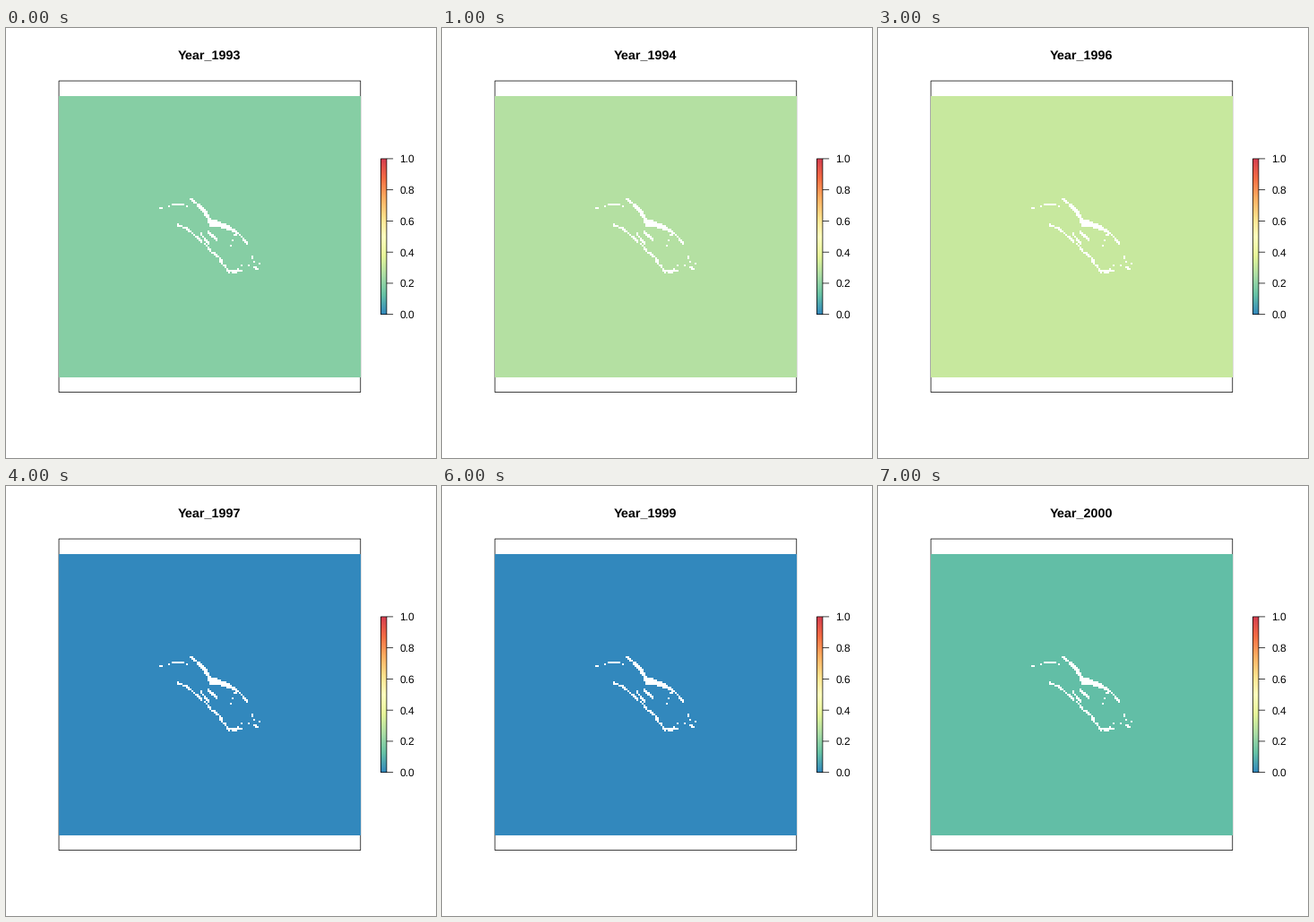
A matplotlib script that plays this animation: 480x480 px, repeating every 8000 ms.

```python
import numpy as np
import matplotlib.pyplot as plt
from matplotlib.animation import FuncAnimation
from matplotlib.colors import LinearSegmentedColormap
from matplotlib.patches import Rectangle

plt.rcParams["text.hinting"] = "no_hinting"

SIZE, DPI = 480, 72
EM = 14.4                                      # one margin line, in pixels
LEFT, RIGHT, TOP, BOTTOM = 59, 396, 76, 390    # map
CELL = 2
FONT = "Liberation Sans"

YEARS = range(1993, 2001)
VALUES = [0.187, 0.27, 0.326, 0.31, 0.0, 0.133, 0.0, 0.119]
SPECTRAL = LinearSegmentedColormap.from_list("spectral", [
    "#3288bd", "#66c2a5", "#abdda4", "#e6f598", "#ffffbf",
    "#fee08b", "#fdae61", "#f46d43", "#d53e4f"], N=256)

# Courses of the water bodies through a few key points, in pixels
RIDGE = [(205, 190), (213, 196), (222, 205), (228, 217), (246, 222),
         (260, 230), (268, 241)]
SHORE = [(192, 220), (202, 224), (220, 239), (238, 259), (248, 272),
         (262, 271)]
CREEKS = [[(217, 229), (226, 240)], [(225, 227), (234, 236)]]
TRAILS = [[(170, 201), (177, 203), (187, 197), (201, 198)],
          [(250, 243), (255, 231)],
          [(257, 269), (263, 264), (275, 267), (289, 271)],
          [(273, 251), (276, 261), (287, 267)]]


def trace(gaps, path, thick=lambda t: 1, keep=1.0):
    """Mark the cells along a path; keep is the share of cells used."""
    xs, ys = (np.array(path) - (LEFT, TOP)).T / CELL
    knots = np.linspace(0, 1, len(path))
    steps = int(max(np.ptp(xs), np.ptp(ys))) + 1
    length = np.r_[0, np.cumsum(np.hypot(np.diff(xs), np.diff(ys)))]
    along = np.linspace(0, length[-1], steps * 2)
    for t in np.interp(along, length, knots):
        if rng.random() > keep:
            continue
        col = int(np.interp(t, knots, xs))
        rows = max(1, round(thick(t)))
        first = int(np.interp(t, knots, ys) - (rows - 1) / 2)
        gaps[first:first + rows, col] = True


def build_gaps():
    """Mask of the cells that hold no data."""
    gaps = np.zeros(((BOTTOM - TOP) // CELL, (RIGHT - LEFT) // CELL), bool)
    trace(gaps, RIDGE, lambda t: 1 + 2.7 * np.sin(np.pi * t) ** 3)
    trace(gaps, SHORE, lambda t: rng.uniform(0.6, 1.8), keep=0.8)
    for path in CREEKS:
        trace(gaps, path)
    for path in TRAILS:
        trace(gaps, path, keep=0.35)
    return gaps


def line(xs, ys):
    ax.plot(xs, ys, color="black", lw=0.75, snap=False, zorder=3,
            solid_capstyle="butt")


def outline(x0, y0, x1, y1, zorder):
    ax.add_patch(Rectangle((x0, y0), x1 - x0, y1 - y0, fill=False, ec="black",
                           lw=0.75, snap=False, zorder=zorder))


fig = plt.figure(figsize=(SIZE / DPI, SIZE / DPI), dpi=DPI, facecolor="white")
ax = fig.add_axes([0, 0, 1, 1])
ax.axis("off")

rng = np.random.default_rng(4)
gaps = build_gaps()
grid = ax.imshow(np.ones(gaps.shape + (3,)), interpolation="nearest",
                 extent=(LEFT, RIGHT, BOTTOM, TOP), aspect="auto", zorder=2)

# The map covers the inner half of the frame's sides.
frame_top, frame_bottom = 4.1 * EM, SIZE - 5.1 * EM
outline(frame_top, frame_top, 395.76, frame_bottom, zorder=1)

# Colour bar, half as high as the frame
bar_left, bar_right = 418.44, 424.92
bar_height = (frame_bottom - frame_top) / 2
bar_top = frame_top + bar_height / 2
bar_bottom = bar_top + bar_height
ax.imshow(np.linspace(1, 0, 256)[:, None], cmap=SPECTRAL, vmin=0, vmax=1,
          extent=(bar_left, bar_right, bar_bottom, bar_top), aspect="auto",
          zorder=2)
outline(bar_left, bar_top, bar_right, bar_bottom, zorder=3)
for value in np.linspace(0, 1, 6):
    y = bar_bottom - bar_height * value
    line([bar_right, bar_right + EM / 2], [y, y])
    ax.text(bar_right + EM, y + 4.3, f"{value:.1f}", family=FONT, size=12,
            va="baseline")

title = ax.text(227.4, 35, "", family=FONT, size=EM, weight="bold",
                ha="center", va="baseline")
ax.set(xlim=(0, SIZE), ylim=(SIZE, 0))


def update(i):
    image = np.ones(gaps.shape + (3,))
    image[~gaps] = SPECTRAL(VALUES[i])[:3]
    grid.set_data(image)
    title.set_text(f"Year_{YEARS[i]}")
    return grid, title


anim = FuncAnimation(fig, update, frames=len(YEARS), interval=1000,
                     repeat=True, repeat_delay=0)
plt.show()
```
